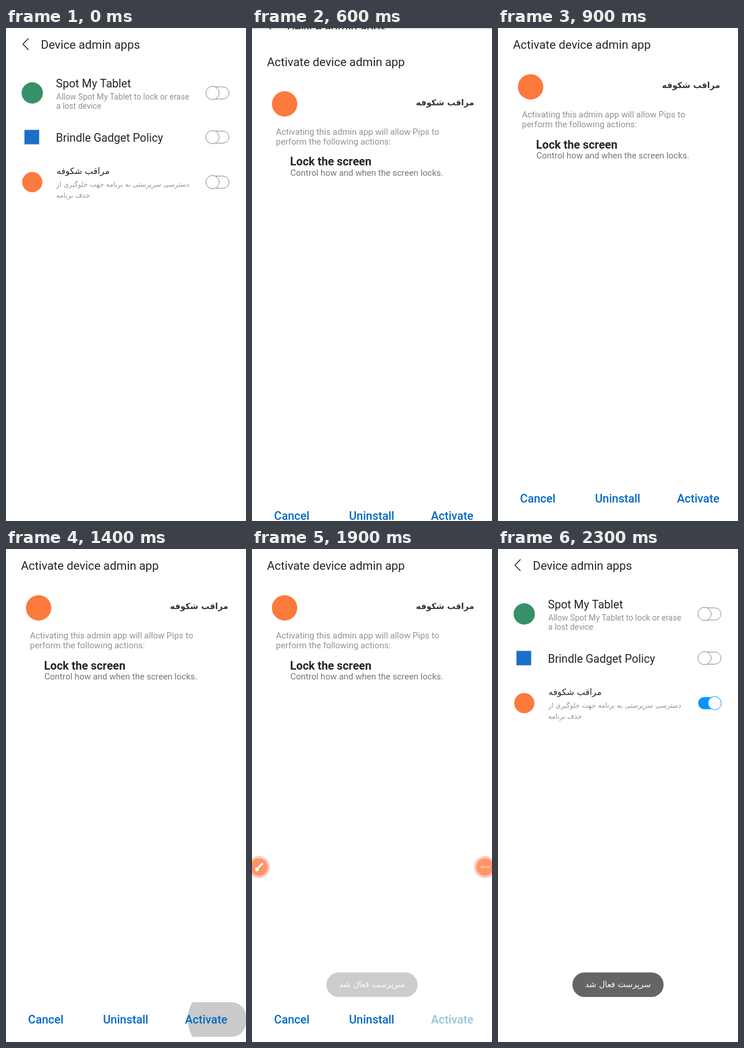
Write an HTML page with a canvas that moves like this. It is 416 by 854 pixels and loops after 2500 ms.

```html
<!DOCTYPE html>
<html lang="en">
<head>
<meta charset="utf-8">
<title>Device admin activation</title>
<style>
  html, body { margin: 0; width: 100%; height: 100%; overflow: hidden; background: #fff; }
  canvas { display: block; width: 416px; height: 854px; }
</style>
</head>
<body>
<canvas id="stage"></canvas>
<script>
const W = 416, H = 854, LOOP = 2500, STEP = 100;
const LATIN = 'Roboto, sans-serif';
const PERSIAN = '"DejaVu Sans", sans-serif';
const APP = 'مراقب شکوفه';
const INK = '#252528', GREY = '#929292', BLUE = '#0068c6', ORANGE = '#fb7a3c';

const canvas = document.getElementById('stage');
const ctx = canvas.getContext('2d');
const ratio = window.devicePixelRatio || 1;
canvas.width = W * ratio;
canvas.height = H * ratio;

const clamp = v => Math.max(0, Math.min(1, v));

function text(str, x, y, size, color, weight = 400, align = 'left') {
  ctx.direction = 'ltr';
  ctx.font = `${weight} ${size}px ${LATIN}`;
  ctx.textAlign = align;
  ctx.fillStyle = color;
  ctx.fillText(str, x, y);
}

function persian(str, x, y, size, color, weight = 400, align = 'left') {
  ctx.direction = 'rtl';
  ctx.font = `${weight} ${size}px ${PERSIAN}`;
  ctx.textAlign = align;
  ctx.fillStyle = color;
  ctx.fillText(str, x, y);
}

function disc(x, y, r, color) {
  ctx.beginPath();
  ctx.arc(x, y, r, 0, Math.PI * 2);
  ctx.fillStyle = color;
  ctx.fill();
}

function pill(x, y, w, h, r) {
  ctx.beginPath();
  ctx.roundRect(x, y, w, h, r);
}

function line(points, width, color) {
  ctx.beginPath();
  points.forEach(([x, y]) => ctx.lineTo(x, y));
  ctx.lineWidth = width;
  ctx.strokeStyle = color;
  ctx.stroke();
}

function toggle(y, on) {
  const color = on ? '#0a94fb' : '#858585';
  ctx.lineWidth = 1;
  ctx.strokeStyle = color;
  pill(347, y - 10.5, 39.5, 21, 10.5);
  if (on) {
    ctx.fillStyle = color;
    ctx.fill();
  } else {
    ctx.stroke();
  }
  disc(on ? 375.5 : 358, y, 11.5, '#fff');
  ctx.stroke();
}

function listPage(on, ripple) {
  ctx.fillStyle = '#fff';
  ctx.fillRect(0, -40, W, H + 80);
  line([[39, 18], [29.5, 28], [39, 38]], 1.7, '#333');
  text('Device admin apps', 60.5, 36, 20.4, INK);

  disc(45.5, 112.5, 18.5, '#379168');
  text('Spot My Tablet', 86.5, 103, 19.6, INK);
  text('Allow Spot My Tablet to lock or erase', 87, 123.5, 14.05, GREY);
  text('a lost device', 87, 139.8, 14.05, GREY);
  toggle(112.5, false);

  ctx.fillStyle = '#1a70c9';
  ctx.fillRect(32, 176.5, 25.5, 25);
  text('Brindle Gadget Policy', 86.5, 196.5, 19.6, INK);
  toggle(189, false);

  disc(45.5, 267, 17.5, ORANGE);
  persian(APP, 87.5, 252.5, 15.2, INK);
  persian('دسترسی سرپرستی به برنامه جهت جلوگیری از', 87, 275, 11.75, GREY);
  persian('حذف برنامه', 87, 294, 11.75, GREY);
  if (ripple > 0) disc(358, 267, 21.5 * ripple, '#c9c9c9');
  toggle(267, on);
}

function activatePage(t) {
  ctx.fillStyle = '#fff';
  ctx.fillRect(0, -40, W, H + 80);
  text('Activate device admin app', 26, 36, 20.45, INK);
  disc(56.5, 102, 22, ORANGE);
  persian(APP, 385, 104, 14.2, '#333', 700, 'right');
  text('Activating this admin app will allow Pips to', 41.5, 155, 14.95, GREY);
  text('perform the following actions:', 41.5, 172, 14.95, GREY);
  text('Lock the screen', 66, 208.7, 19.8, INK, 700);
  text('Control how and when the screen locks.', 66.5, 226, 15, '#757575');
  buttonRipple(t);
  text('Cancel', 69, 822.3, 20, BLUE, 500, 'center');
  text('Uninstall', 207.5, 822.3, 20, BLUE, 500, 'center');
  text('Activate', 347, 822.3, 20, t < 1800 ? BLUE : '#92c8d6', 500, 'center');
}

function buttonRipple(t) {
  if (t < 1400 || t >= 1800) return;
  ctx.save();
  pill(278, 785, 138, 60, 25);
  ctx.clip();
  disc(375, 815, 60 + (t - 1400) * 0.5, t < 1700 ? '#cacaca' : '#e8e8e8');
  ctx.restore();
}

function opening(t) {
  const reveal = 1 - (1 - clamp((t - 420) / 200)) ** 2.6;
  const top = t < 700 ? Math.max(1.5, H * (1 - reveal)) : 0;
  const rest = clamp((900 - t) / 300);
  const shift = t < 600 ? 36 : 29.5 * rest ** 2.22;

  if (top > 0) {
    ctx.save();
    ctx.translate(0, t < 600 ? -12 : -29);
    listPage(false, t < 600 ? 1 : 0);
    ctx.restore();
    ctx.fillStyle = 'rgba(0,0,0,.12)';
    ctx.fillRect(0, 0, W, H);
  }
  ctx.save();
  ctx.beginPath();
  ctx.rect(0, top, W, H - top);
  ctx.clip();
  ctx.translate(0, shift);
  activatePage(t);
  ctx.restore();
}

function recorderButtons() {
  for (const x of [12, 404]) {
    disc(x, 551, 19, '#ffc7ba');
    disc(x, 551, 15, '#ff9467');
  }
  ctx.lineCap = 'round';
  line([[18, 545], [11.5, 551.5]], 3.2, '#fff');
  ctx.lineCap = 'butt';
  disc(8.5, 555, 3.2, '#fff');
  text('00:03', 404, 553.3, 6.2, '#fff', 400, 'center');
}

function toast(t) {
  if (t < 1900) return;
  ctx.save();
  ctx.globalAlpha = t < 2000 ? 0.33 : 1;
  pill(129, 733.5, 158, 42.5, 21);
  ctx.fillStyle = '#656565';
  ctx.fill();
  ctx.restore();
  persian('سرپرست فعال شد', 208, 759, 14.2, '#fff', 400, 'center');
}

function draw(t) {
  ctx.setTransform(ratio, 0, 0, ratio, 0, 0);
  ctx.textBaseline = 'alphabetic';
  if (t < 500) {
    listPage(false, clamp((t - 200) / 200));
  } else if (t < 900) {
    opening(t);
  } else if (t < 2100) {
    activatePage(t);
  } else {
    ctx.save();
    ctx.translate(0, t < 2200 ? -4 : 0);
    listPage(true, 0);
    ctx.restore();
  }
  if (t >= 1800 && t < 2200) recorderButtons();
  toast(t);
}

const start = performance.now();
function tick() {
  const t = (performance.now() - start) % LOOP;
  draw(Math.floor(t / STEP) * STEP);
  requestAnimationFrame(tick);
}
tick();
</script>
</body>
</html>
```
